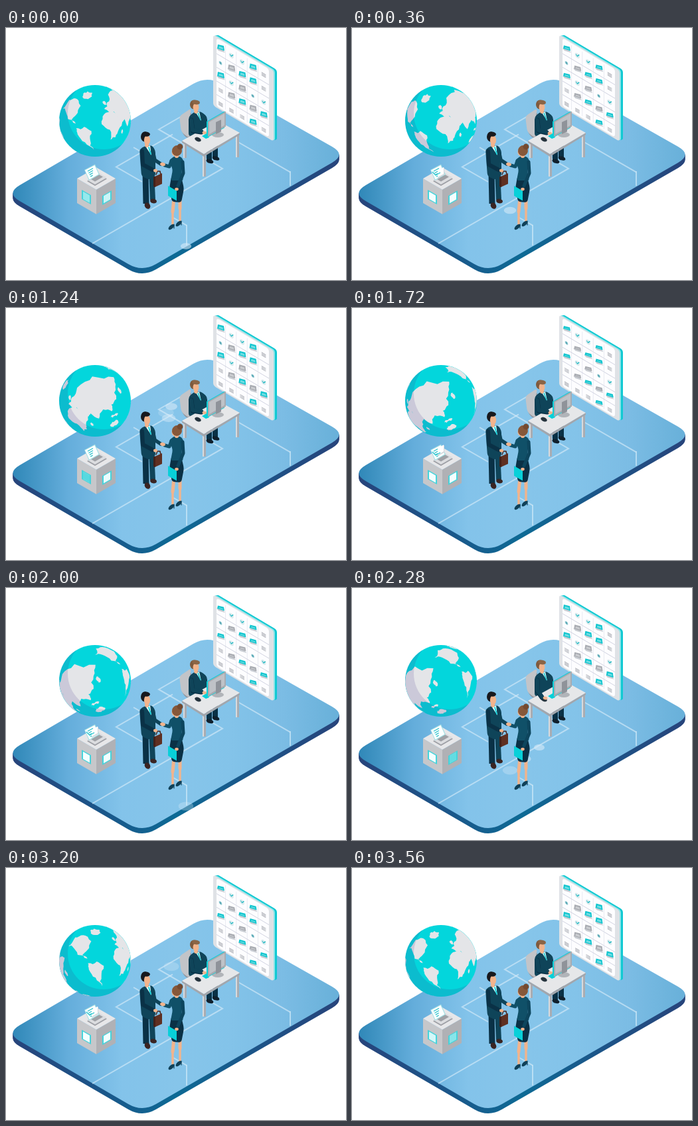
An HTML page with a canvas for the animation above (3.6 s loop, 512 by 380 pixels).

```html
<!DOCTYPE html>
<html lang="en">
<head>
<meta charset="utf-8">
<title>Isometric office</title>
<style>
html, body { margin: 0; width: 100%; height: 100%; overflow: hidden; background: #fff; }
canvas { display: block; }
</style>
</head>
<body>
<canvas id="stage" width="512" height="380"></canvas>
<script>
const ctx = document.getElementById('stage').getContext('2d');
const LOOP = 3600, TAU = Math.PI * 2, RAD = Math.PI / 180, ISO = 0.577;
const CYAN = '#08d0d8', SUIT = '#0f4459', NAVY = '#0a3146', SKIN = '#f2b48c';

const clamp = (x, lo, hi) => Math.max(lo, Math.min(hi, x));
const ease = x => { x = clamp(x, 0, 1); return x * x * (3 - 2 * x); };
const wave = (t, period) => Math.cos(t / period * TAU);

function trace(points) {
  ctx.beginPath();
  for (let i = 0; i < points.length; i += 2) ctx.lineTo(points[i], points[i + 1]);
}
function poly(color, ...points) {
  trace(points);
  ctx.closePath();
  ctx.fillStyle = color;
  ctx.fill();
}
function line(color, width, ...points) {
  trace(points);
  ctx.strokeStyle = color;
  ctx.lineWidth = width;
  ctx.stroke();
}
function oval(color, x, y, rx, ry = rx, turn = 0) {
  ctx.beginPath();
  ctx.ellipse(x, y, rx, ry, turn, 0, TAU);
  ctx.fillStyle = color;
  ctx.fill();
}
// Flat tile spanned by a (right and down) and b (right and up).
function tile(color, x, y, a, b) {
  poly(color, x, y, x + b, y - b * ISO, x + a + b, y + (a - b) * ISO, x + a, y + a * ISO);
}
// Upright wall of width w; slope is +1 for left walls and -1 for right walls.
function wall(color, x, y, w, h, slope) {
  const dy = w * ISO * slope;
  poly(color, x, y, x + w, y + dy, x + w, y + dy + h, x, y + h);
}
function gradient(x0, x1, ...stops) {
  const g = ctx.createLinearGradient(x0, 0, x1, 0);
  stops.forEach((c, i) => g.addColorStop(i / (stops.length - 1), c));
  return g;
}
// Closed shape whose corners are softened by a distance d along each edge.
function softPoly(color, d, corners) {
  const n = corners.length;
  const toward = (a, b) => {
    const k = d / Math.hypot(b[0] - a[0], b[1] - a[1]);
    return [a[0] + (b[0] - a[0]) * k, a[1] + (b[1] - a[1]) * k];
  };
  ctx.beginPath();
  corners.forEach((c, i) => {
    ctx.lineTo(...toward(c, corners[(i + n - 1) % n]));
    ctx.quadraticCurveTo(...c, ...toward(c, corners[(i + 1) % n]));
  });
  ctx.closePath();
  ctx.fillStyle = color;
  ctx.fill();
}

const floorFill = gradient(11, 501, '#3088b8', '#64addb', '#83c3ea', '#86c5ea', '#83c3e9', '#7bbce4', '#68b0d9');
const sideFill = gradient(11, 501, '#27447b', '#1c5488', '#0d6a95', '#1d5488', '#27447b');

// Start, then steps taken in turn along b and a.
function floorLine(x, y, ...steps) {
  const points = [x, y];
  steps.forEach((s, i) => points.push(x += s, y += i % 2 ? s * ISO : -s * ISO));
  line('rgba(214,236,249,.65)', 2, ...points);
}
function ripple(t, birth, x, y) {
  const p = ((t - birth + LOOP) % 1800) / 310;
  if (p < 1) oval(`rgba(215,235,248,${0.6 * (1 - p * p)})`, x, y, 8 + 5 * p, 4.6 + 2.9 * p);
}
function drawFloor(t) {
  const slab = dy => [[0, 249 + dy], [303, 72 + dy], [512, 191 + dy], [205, 368 + dy]];
  for (let dy = 8; dy > 0; dy--) softPoly(sideFill, 24, slab(dy));
  softPoly(floorFill, 24, slab(0));
  ctx.lineJoin = 'miter';
  ctx.lineCap = 'butt';
  floorLine(130, 325, 196, -26);
  floorLine(205, 232, 0, -39, 85);
  floorLine(192, 180, 0, 48);
  floorLine(275, 127, -45, 40);
  floorLine(346, 170, 0, 82);
  floorLine(250, 285, 0, 22);
  line('rgba(214,236,249,.65)', 2, 428, 216, 428, 238);
  line('rgba(214,236,249,.65)', 2, 272, 297, 272, 328);

  ripple(t, 1790, 271, 329);
  for (let i = 0; i < 5; i++) ripple(t, 280 + 100 * i, 238 + 22 * i, 275 - 17.3 * i);
  for (let i = 0; i < 3; i++) ripple(t, 1000 + 90 * i, 241 + 4 * i, 158 + 10 * Math.sin(2.2 * i));
}

// Roughens a few key points into a coastline by displacing midpoints.
function coast(...keys) {
  let seed = keys.length + keys[0][0], points = keys;
  const random = () => { const v = Math.sin(seed++ * 12.9898) * 43758.5453; return v - Math.floor(v); };
  for (let pass = 0; pass < 2; pass++) {
    points = points.flatMap((p, i) => {
      const q = points[(i + 1) % points.length], k = (random() - 0.5) * 0.42;
      return [p, [(p[0] + q[0]) / 2 + (q[1] - p[1]) * k, (p[1] + q[1]) / 2 - (q[0] - p[0]) * k]];
    });
  }
  return points;
}
const island = (u, v, ru, rv) => coast(...Array.from({ length: 6 }, (_, i) =>
  [u + ru * Math.cos(i * TAU / 6), v + rv * Math.sin(i * TAU / 6)]));

const lands = [
  // Africa, Eurasia, North and South America
  coast([18, 4], [33, 5], [48, -17], [36, -29], [27, -40], [15, -41], [18, -23], [8, -9]),
  coast([22, 12], [33, 20], [47, 32], [84, 41], [123, 24], [112, 8], [104, -11], [92, -16], [90, -27],
    [76, -18], [63, -30], [54, -16], [47, -19], [36, 2]),
  coast([-66, 42], [-48, 55], [-24, 52], [-14, 33], [-27, 21], [-40, 17], [-32, 8], [-46, 20], [-53, 36]),
  coast([-34, 1], [-20, -2], [-12, -13], [-22, -27], [-30, -47], [-33, -26], [-37, -9]),
  island(8, 49, 13, 9),
  island(94, -53, 14, 7),
  island(28, 21, 3, 4),
  island(45, -35, 3, 4),
  island(94, -36, 9, 3),
  island(117, 0, 3, 6)
];
const WRAP = 200, RADIUS = 54;

function drawGlobe(t) {
  ctx.save();
  ctx.translate(134, 140);
  ctx.beginPath();
  ctx.arc(0, 0, RADIUS, 0, TAU);
  ctx.clip();
  ctx.fillStyle = '#03d6dc';
  ctx.fillRect(-RADIUS, -RADIUS, 2 * RADIUS, 2 * RADIUS);
  ctx.save();
  ctx.rotate(-23 * RAD);
  const spin = t / LOOP * WRAP;
  for (const land of lands) {
    for (let shift = -WRAP; shift <= 2 * WRAP; shift += WRAP) {
      poly('#e4e5e8', ...land.flatMap(([lon, lat]) => {
        const u = clamp(lon - spin + shift, -90, 90) * RAD, v = lat * RAD;
        return [RADIUS * Math.cos(v) * Math.sin(u), -RADIUS * Math.sin(v)];
      }));
    }
  }
  ctx.restore();
  ctx.beginPath();
  ctx.arc(0, 0, RADIUS + 1, 0, TAU);
  ctx.arc(13, -11, RADIUS, 0, TAU, true);
  ctx.fillStyle = 'rgba(60,40,130,.15)';
  ctx.fill('evenodd');
  ctx.restore();
}

// L and G: laptops, c: tick, d: dot, t: text lines
const board = ['LccLt', 'dGLLt', 'LcGdc', 'tGLGL', 'tttLt'];

function drawIcon(kind, x, y, fold) {
  ctx.save();
  ctx.translate(x, y);
  if (kind === 'L' || kind === 'G') {
    const color = kind === 'L' ? '#12c6cf' : '#a9acb2';
    poly('#c9cdd3', -6, 2, 4, -1, 7, 1, -3, 4);
    poly(color, -4, -5 + fold, 5, -8 + fold, 6, -1, -5, 2);
    poly('rgba(255,255,255,.4)', -2, -3.5 + fold, 3.5, -5 + fold, 4, -2, -3, 0);
  } else if (kind === 'c') {
    oval('#dcebee', 0, 0, 3.6);
    line('#2bbcc6', 1.2, -2, -1, 0, 1, 3, -3);
  } else if (kind === 'd') {
    oval('#9ccfd6', 0, 0, 2.4);
    oval('#4d9fae', 0, 0, 1.3);
  } else {
    for (let k = -2; k <= 2; k += 2) line('#9a9da5', 0.9, -3, k, 3.5, k);
  }
  ctx.restore();
}

function drawBoard(t) {
  ctx.save();
  const face = (color, dx, dy, left, right, edge) => {
    ctx.setTransform(1, 0.595, 0, 1, 312 + dx, 10 + dy);
    ctx.beginPath();
    ctx.roundRect(left, edge, 91 - left - right, 107 - 2 * edge, 4);
    ctx.fillStyle = color;
    ctx.fill();
  };
  for (let d = 5; d > 0; d--) face(d > 2 ? '#10c9d2' : '#8fe3e8', d, -d * 0.2, 0, 0, 0);
  face('#dfe2e6', 0, 0, 0, 0, 0);
  face('#fdfdff', 0, 0, 5, 7, 2);
  for (let i = 1; i < 5; i++) {
    line('#e4e6ee', 0.8, 2 + 16.4 * i, 5, 2 + 16.4 * i, 102);
    line('#c3c5d6', 0.8, 5, 5 + 20.6 * i, 84, 5 + 20.6 * i);
  }
  const fold = 1.2 - 1.2 * wave(t, 1200);
  board.forEach((row, r) => [...row].forEach((kind, c) =>
    drawIcon(kind, 11 + 16.2 * c, 15.5 + 20.7 * r, fold)));
  ctx.restore();
}

function drawPodium(t) {
  wall('#c6c7ca', 107, 227, 29, 37, 1);
  wall('#b0b1b5', 136, 243.7, 29, 37, -1);
  tile('#e7e7e9', 107, 227, 29, 29);
  // the two windows light up one after the other
  const glow = shift => Math.max(0, wave(t - shift, 1200)) ** 12;
  const pane = (x, y, slope, lit) => {
    wall('#45d3db', x, y, 14, 14, slope);
    wall('#f3ffff', x + 2, y + 2 * ISO * slope + 1.5, 10, 11, slope);
    ctx.globalAlpha = lit * 0.8;
    wall('#22cdd6', x + 2, y + 2 * ISO * slope + 1.5, 10, 11, slope);
    ctx.globalAlpha = 1;
  };
  pane(114, 244, 1, glow(60));
  pane(145, 253, -1, glow(1110));

  tile('#9c9ea4', 122, 231, 12, 18);
  tile('#dcdde0', 122, 229, 12, 18);
  tile('#9fa1a6', 128, 228, 6, 12);
  poly('#a3dfe3', 118, 214, 134, 205.5, 141, 221, 125, 230);
  poly('#fbffff', 119, 214.5, 133.5, 207, 139.5, 220.5, 125.5, 228.5);
  for (let k = 0; k < 4; k++) {
    const x = 123 + 1.4 * k, y = 216 + 2.7 * k;
    line('#2cc3cc', 1.3, x, y, x + 8 - k * 1.5, y - 4.5 + k * 0.8);
  }
  const rise = -wave(t, 1200);
  if (rise > 0.1) {
    wall('#d5d8dd', 129, 218 - 6 * rise, 10, 11, -1);
    wall('#ffffff', 129, 217 - 6 * rise, 9, 10, -1);
    line('#22c5cd', 1.3, 121, 217, 126, 222, 133, 218);
  }
}

function drawDesk(t) {
  softPoly('#92969d', 5, [[265, 130], [278, 125], [284, 160], [273, 167], [265, 158]]);
  softPoly('#c2c4c8', 5, [[261, 133], [279, 121], [276, 140], [276, 166], [264, 157]]);
  ctx.lineCap = 'butt';
  for (const dx of [0, 9]) {
    line(NAVY, 8, 293 + dx, 172, 306 + dx, 180 - dx / 2, 306 + dx, 200 - dx / 2);
    oval('#10202c', 307 + dx, 201 - dx / 2, 5.5, 3, 0.3);
  }
  softPoly(SUIT, 4, [[275, 134], [284, 126], [294, 126], [303, 134], [303, 152], [296, 163], [275, 163]]);
  poly('#d7fbfc', 286, 128, 291, 126, 294, 140);
  line('#12bcc5', 1.5, 289, 128, 293, 139);
  oval(SKIN, 286, 125, 3, 4);
  oval('#7f5a3d', 283, 115.5, 6, 7);
  oval(SKIN, 286, 119.5, 4.4, 6.2);
  oval('#8b6546', 286, 112, 6, 3.4, 0.15);

  const post = (x, y, h) => {
    ctx.fillStyle = '#a9acb2';
    ctx.fillRect(x - 2, y, 5, h);
    ctx.fillStyle = '#d8dadd';
    ctx.fillRect(x - 2, y, 2, h);
  };
  post(269, 172, 24);
  post(348, 161, 34);
  post(298, 193, 31);
  poly('#a3a6ac', 265, 170, 298, 190, 352, 158, 352, 161, 298, 194, 265, 173);
  poly('#e6e7e9', 265, 170, 319, 140, 352, 158, 298, 190);

  oval('#26343e', 289, 168, 5, 3, 0.4);
  const phase = t % 1800;
  const reach = ease((phase - 330) / 140) - ease((phase - 800) / 140);
  const hx = 298 - 8 * reach, hy = 158 + 8 * reach;
  ctx.lineCap = 'round';
  line(NAVY, 7, 279, 139, 281 - 2 * reach, 155, hx - 4, hy - 1);
  line(SUIT, 6, 279, 139, 281 - 2 * reach, 154, hx - 4, hy - 2);
  oval(SKIN, hx + 1, hy, 3.4, 2.3, 0.3);

  oval('#b1b4b9', 319, 161, 9, 4);
  wall(CYAN, 302, 141, 27, 25, -1);
  poly(CYAN, 295, 163, 302, 159, 306, 165, 301, 167);
  wall('#a7abb1', 304, 141, 27, 23, -1);
  wall('#bfc2c7', 306, 142, 23, 18, -1);
  wall('#8f939a', 316, 142, 8, 18, -0.8);
}

function drawMan() {
  ctx.lineCap = 'butt';
  line(NAVY, 9, 210, 218, 211, 265);
  line(SUIT, 8, 219, 216, 221, 259);
  oval('#3a2422', 213, 268, 4, 5, -0.6);
  oval('#3a2422', 222, 261, 5, 3.4, 0.2);
  ctx.lineCap = 'round';
  line('#4b251d', 1.5, 226, 221, 228, 216, 232, 216, 233, 221);
  wall('#5f3022', 224, 224, 11, 16, -0.8);
  wall('#43211a', 222, 223, 3, 16, 0.6);
  softPoly(SUIT, 4, [[201, 183], [209, 178], [220, 177], [225, 185], [225, 223], [215, 229], [204, 223]]);
  poly('#e4fcfd', 211, 180, 217, 177, 219, 192);
  line(CYAN, 1.8, 215, 180, 218, 190);
  line(NAVY, 6, 205, 186, 206, 206, 221, 214);
  line(SUIT, 5.5, 221, 185, 224, 199, 233, 205);
  oval(SKIN, 225, 215, 3, 2.4);
  oval(SKIN, 212, 176, 3, 4);
  oval('#17191e', 209, 164, 6, 7.5);
  oval(SKIN, 212.5, 169, 4.6, 7);
  oval('#17191e', 211, 160, 6, 3.6, 0.1);
}

function drawWoman() {
  ctx.lineCap = 'round';
  const leg = (x, y, foot) => {
    line(SKIN, 5, x, 256, x - foot, y - 20);
    line(SKIN, 3.4, x - foot, y - 22, x - foot, y);
    oval('#0f4058', x - foot - 2, y + 3, 5.5, 2.6, -0.75);
    line('#0f4058', 1.2, x - foot + 2, y - 1, x - foot + 2, y + 5);
  };
  leg(253, 297, 2);
  leg(262, 292, 0);
  softPoly('#0a3146', 4, [[249, 224], [264, 224], [268, 242], [264, 263], [250, 262], [246, 242]]);
  softPoly('#105068', 3, [[246, 199], [254, 193], [264, 194], [268, 202], [264, 216], [267, 230], [248, 230], [251, 214]]);
  line('#105068', 5, 249, 200, 246, 209, 239, 207);
  line('#0d455d', 5, 266, 202, 267, 219, 259, 238);
  oval(SKIN, 236, 205.5, 4, 2.6, 0.2);
  wall(CYAN, 244, 238, 13, 15, 1);
  oval(SKIN, 257, 243, 2.8, 2.3);
  oval(SKIN, 257, 192, 3.4, 4);
  oval(SKIN, 254, 187, 4.5, 6);
  oval('#86583a', 257.5, 185, 7.5, 8, 0.2);
  oval('#744a30', 262, 179, 4.4);
}

function draw() {
  const t = performance.now() % LOOP;
  ctx.fillStyle = '#fff';
  ctx.fillRect(0, 0, 512, 380);
  drawFloor(t);
  ctx.lineJoin = 'round';
  drawBoard(t);
  drawGlobe(t);
  drawPodium(t);
  drawDesk(t);
  drawMan();
  drawWoman();
  requestAnimationFrame(draw);
}
draw();
</script>
</body>
</html>
```
